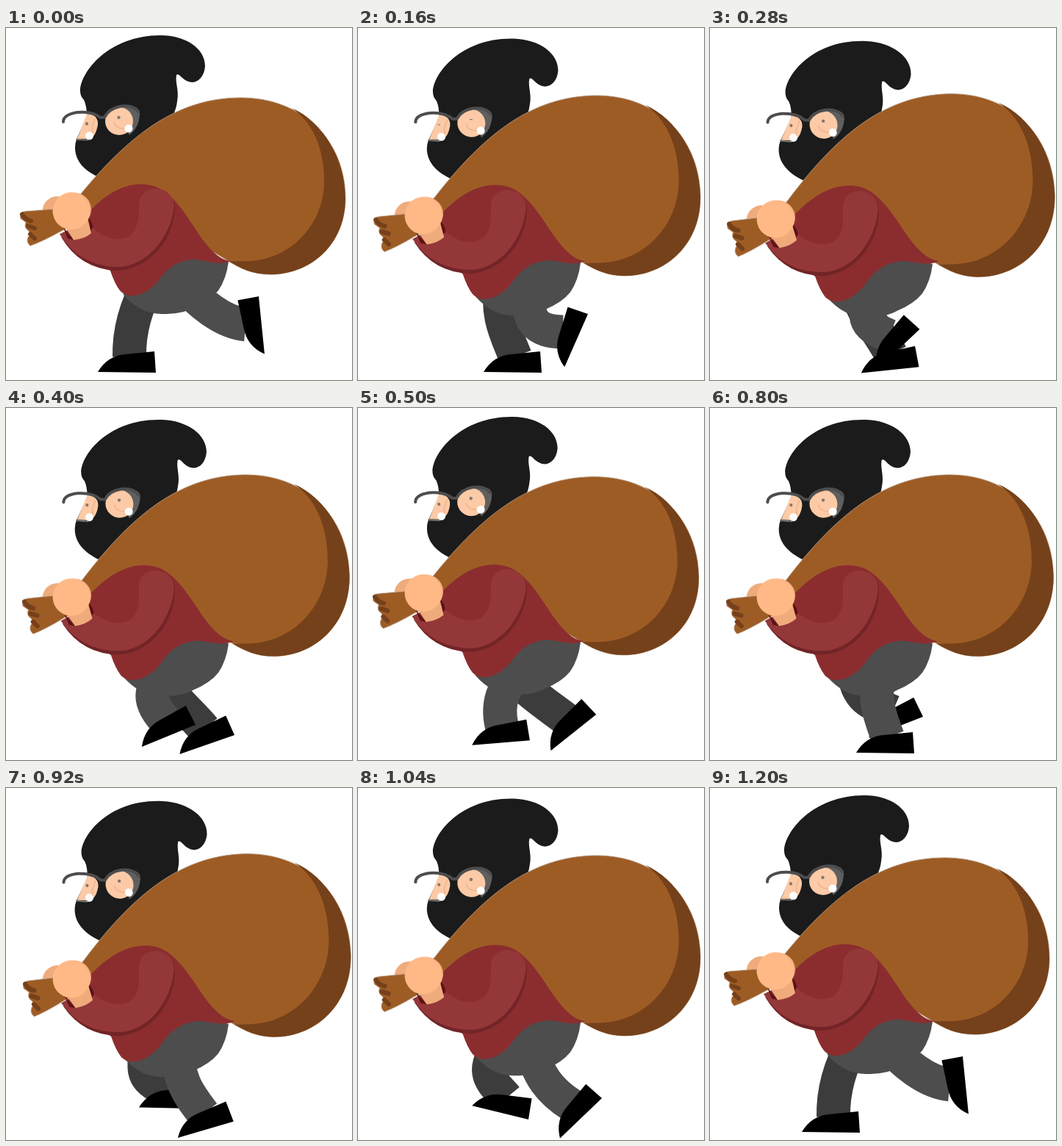
These frames come from a looping animation (471x480 px, 1.22 s). An HTML page:

```html
<!DOCTYPE html>
<html lang="en">
<head>
<meta charset="utf-8">
<title>Sneaking burglar</title>
<style>
html, body { margin: 0; width: 100%; height: 100%; overflow: hidden; background: #fff; }
svg { display: block; width: 100vw; height: 100vh; }
.line { fill: none; stroke-linecap: round; stroke-linejoin: round; }
.leg { fill: none; stroke-width: 46; }
</style>
</head>
<body>
<svg viewBox="0 0 471 480">
  <defs>
    <path id="boot" d="M0 0L-2-29L-42-25Q-66-23-79-1Z"/>
  </defs>

  <g id="far"><path class="leg" stroke="#3c3c3c"/><use href="#boot"/></g>
  <path id="hips" fill="#4d4d4d" d="M160 364Q183 390 212 390Q240 390 254 382Q278 372 289 358Q300 342 303 318L250 300L160 335Z"/>
  <g id="near"><path class="leg" stroke="#4d4d4d"/><use href="#boot"/></g>

  <g class="head">
    <path fill="#1b1b1b" d="M130 205C105 195 94 180 94 163Q94 157 96 152L110 120Q110 106 106 98Q101 93 101 86C101 60 140 10 210 10C245 10 271 28 271 52C270 66 262 74 253 74C240 73 236 60 232 64C230 75 236 85 233 100C230 130 200 160 130 205Z"/>
    <path fill="#5f5f5f" d="M148 108Q183 101 182 118Q181 136 168 146Z"/>
    <path fill="#fccaa6" d="M110 117Q126 118 125 132Q122 150 112 151L97 151Z"/>
    <circle cx="154" cy="127" r="19" fill="#fccaa6"/>
    <path class="line" stroke="#f1b58d" stroke-width="1.6" d="M147 129Q150 138 162 137M121 124Q116 136 118 143"/>
    <path class="line" stroke="#777" stroke-width="2" d="M96 152L111 152.500"/>
    <g fill="#85766b">
      <ellipse class="pupil" cx="153.500" cy="122" rx="2.200"/>
      <ellipse class="pupil" cx="110" cy="130.500" rx="2"/>
    </g>
    <path class="line" stroke="#4d4d4d" stroke-width="4" d="M78 128Q78 118 97 115Q118 113 128 122L134 122Q140 110 155 107Q172 104 180 114"/>
    <circle cx="113.500" cy="147" r="5.500" fill="#fff"/>
    <circle cx="167" cy="137" r="5.500" fill="#fff"/>
  </g>

  <g class="arm"><circle cx="70" cy="250" r="20.500" fill="#efab7b"/></g>

  <g class="sack">
    <path fill="#9e5c25" stroke="#b59c85" stroke-width=".8" d="M66 247Q88 243 102 226C170 144 234 95 320 95C400 95 462 150 462 232C462 295 415 336 360 336C335 336 318 327 303 318L240 280L185 225Q140 225 115 248Q95 270 75 277Q50 291 33 297Q27 292 30 285Q36 281 30 276Q24 272 27 265L20 260Q17 251 26 250Z"/>
    <path fill="#75411a" d="M389 109C423 132 434 175 433 212C432 267 388 318 325 318L303 318C318 327 335 336 360 336C415 336 462 295 462 232C462 180 432 128 389 109Z"/>
    <path class="line" stroke="#75411a" stroke-width="6" d="M22 254Q26 261 34 263M30 270L39 273M33 281L39 287"/>
  </g>

  <path class="shirt" fill="#8b2d2f" d="M115 248Q150 213 183 213C205 213 218 222 232 238C256 265 274 312 305 318C285 326 265 313 250 316C215 322 212 345 198 354C185 366 166 370 155 358Q148 349 142 331L90 285Z"/>

  <g class="arm">
    <path fill="#722427" d="M75 285Q100 328 150 331C205 329 235 272 229 236Q215 300 150 312Z"/>
    <path fill="#943738" d="M73 281Q98 323 150 326C195 326 226 280 229 242C226 213 184 210 181 240C182 275 172 288 152 288Q132 287 116 270L85 275Z"/>
    <path fill="#5c1216" d="M78 272L92 289L84 287ZM112 258Q119 267 118 273L112 279Z"/>
    <path fill="#efab7b" d="M80 270L92 289Q106 288 116 280L111 258Z"/>
    <circle cx="93" cy="247.500" r="23" fill="#f0ac7c"/>
    <circle cx="89" cy="249.500" r="25.500" fill="#ffb987"/>
  </g>
</svg>
<script>
const LOOP = 1220, CYCLE = 1200, STEP = 20;
const all = s => [...document.querySelectorAll(s)];

// Matrix of each part at the low end of the bob.
const low = {
  head: [1, .056, -.027, 1, 4, -3.7],
  sack: [1.0085, -.04, .027, 1.0425, -2.9, 3.5],
  shirt: [1.033, -.047, 0, 1.036, -3.5, 2.9],
  arm: [1, -.067, .067, 1, -16.6, 17.2]
};
const rest = [1, 0, 0, 1, 0, 0];
const parts = Object.keys(low).map(name => ({ els: all('.' + name), to: low[name] }));
const pupils = all('.pupil');
const hips = document.getElementById('hips');

// Heel x, heel y and boot angle at the shared key times; the knees follow.
const times = [0, 160, 400, 620, 800, 1040];
const legs = [
  {
    id: 'near', hipX: 236, bend: .8,
    x: [344, 313, 258, 216.5, 278, 332],
    y: [366, 390, 432, 470, 471, 423],
    turn: [-96.5, -67, -23, 7, 0, -44.5]
  },
  {
    id: 'far', hipX: 196, bend: .75,
    x: [204, 250, 311, 332, 290, 232],
    y: [470, 470, 446, 391, 421, 452],
    turn: [0, 0, -20, -57, -22, 13]
  }
];
for (const leg of legs) {
  const g = document.getElementById(leg.id);
  leg.tube = g.querySelector('path');
  leg.boot = g.querySelector('use');
}

// Periodic cubic through the keys that never overshoots.
function ease(values, t) {
  const n = times.length;
  const time = i => times[(i + n) % n] + Math.floor(i / n) * CYCLE;
  const value = i => values[(i + n) % n];
  const slope = i => (value(i + 1) - value(i)) / (time(i + 1) - time(i));
  const tangent = (s, r) => s * r > 0 ? 2 * s * r / (s + r) : 0;
  const i = times.findLastIndex(k => k <= t);
  const span = time(i + 1) - time(i), u = (t - time(i)) / span;
  const m0 = tangent(slope(i - 1), slope(i)) * span;
  const m1 = tangent(slope(i), slope(i + 1)) * span;
  const rise = value(i + 1) - value(i);
  return value(i) + u * (m0 + u * (3 * rise - 2 * m0 - m1 + u * (m0 + m1 - 2 * rise)));
}

// The shorter the way from hip to ankle, the further the knee bows forward.
function drawLeg(leg, t, drop) {
  const x = ease(leg.x, t), y = ease(leg.y, t), turn = ease(leg.turn, t);
  const r = turn * Math.PI / 180, cos = Math.cos(r), sin = Math.sin(r);
  const hx = leg.hipX, hy = 345 + drop;
  const ax = x - 36 * cos + 22 * sin, ay = y - 36 * sin - 22 * cos;
  const dx = ax - hx, dy = ay - hy, reach = Math.hypot(dx, dy);
  const bow = Math.max(15, leg.bend * Math.sqrt(Math.max(0, 108 ** 2 - reach ** 2))) / reach;
  const kx = (hx + ax) / 2 + bow * (.36 * dx - dy);
  const ky = (hy + ay) / 2 + bow * (.36 * dy + dx);
  const toKnee = (p, k) => p + (k - p) * 2 / 3;
  const shinX = (toKnee(ax, kx) + ax + 32 * sin) / 2;
  const shinY = (toKnee(ay, ky) + ay - 32 * cos) / 2;
  leg.tube.setAttribute('d',
    `M${hx} ${hy}C${toKnee(hx, kx)} ${toKnee(hy, ky)} ${shinX} ${shinY} ${ax} ${ay}`);
  leg.boot.setAttribute('transform', `translate(${x} ${y}) rotate(${turn})`);
}

function draw(now) {
  const t = Math.floor(now % LOOP / STEP) * STEP % CYCLE;
  const p = (1 - Math.cos(t / 300 * Math.PI)) / 2;
  for (const { els, to } of parts) {
    const m = rest.map((v, i) => v + (to[i] - v) * p);
    els.forEach(el => el.setAttribute('transform', `matrix(${m})`));
  }
  hips.setAttribute('transform', `translate(0 ${4 * p})`);
  legs.forEach(leg => drawLeg(leg, t, 4 * p));
  const open = Math.min(1, Math.abs(t - 160) / 60);
  pupils.forEach(el => el.setAttribute('ry', .6 + 1.6 * open));
}

function tick() {
  draw(performance.now());
  requestAnimationFrame(tick);
}
tick();
</script>
</body>
</html>
```
